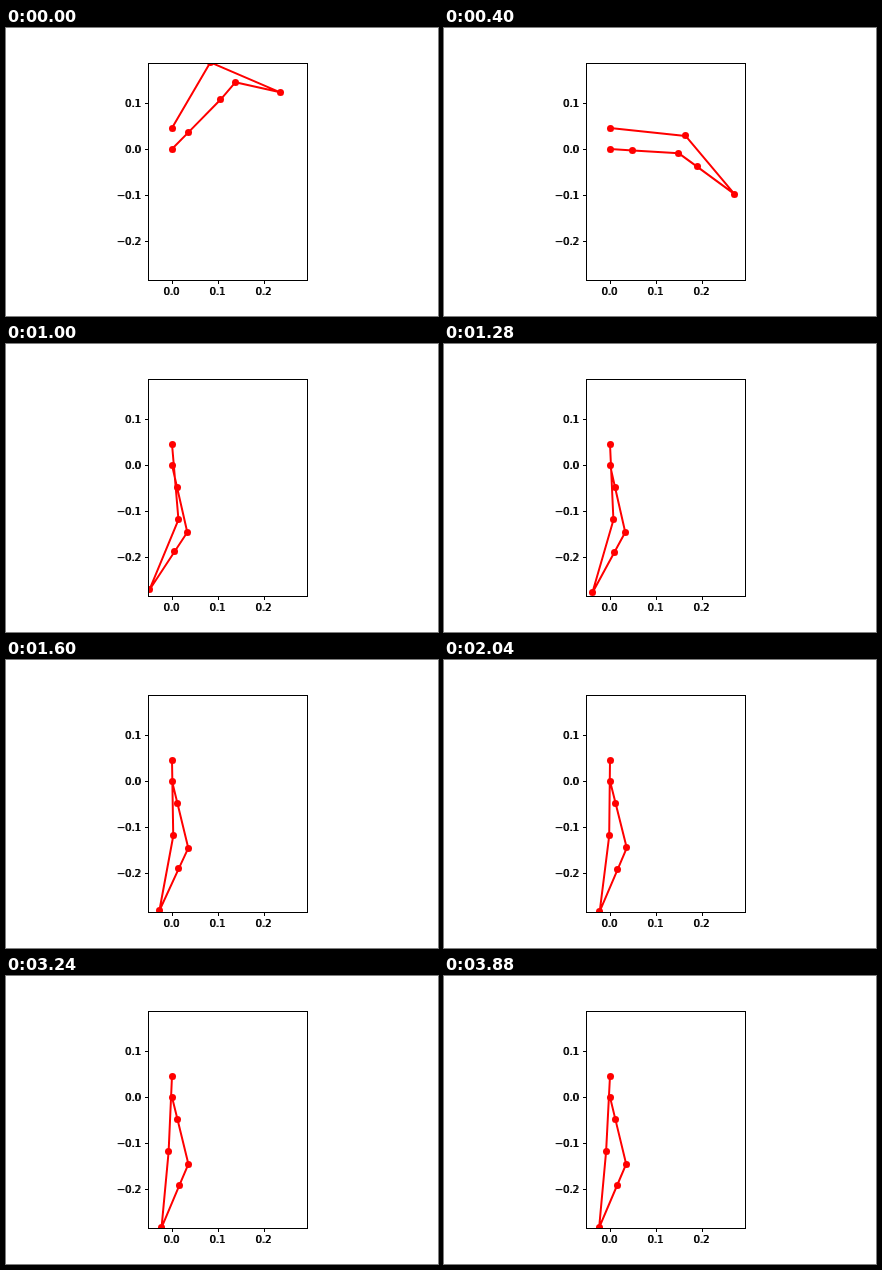
Animation of 432x288 px, one loop 4 s. Source, as an HTML page with a canvas:

```html
<!DOCTYPE html>
<html lang="en">
<head>
<meta charset="utf-8">
<style>
  html, body { margin: 0; width: 432px; height: 288px; overflow: hidden; background: #fff; }
  canvas { display: block; }
</style>
</head>
<body>
<canvas id="stage" width="432" height="288"></canvas>
<script>
const ctx = document.getElementById('stage').getContext('2d');
const LOOP = 4000, STEP = 40, LAST = 3880;
const box = { left: 142.5, top: 35.5, right: 301.5, bottom: 252.5 };
const base = [166, 121], upperBase = [166, 100], unit = 46;
const SHORT = 23, LONG = 46, ARM = 76;
const rad = Math.PI / 180;

// Fall from a starting angle towards a rest angle that is still settling
function fall(t, { from, rest, drift, settle, time, power }) {
  const goal = rest + drift * Math.exp(-t / settle);
  return from + (goal - from) * (1 - Math.exp(-((t / time) ** power)));
}
const upperArm = { from: -59.7, rest: 93.4, drift: -21.5, settle: 1000, time: 480, power: 2.43 };
const foreArm = { from: 23.2, rest: 95.2, drift: 202, settle: 440, time: 682, power: 3.1 };

const reach = ([x, y], length, angle) =>
  [x + length * Math.cos(angle), y + length * Math.sin(angle)];

// Joint between p and q with link lengths a and b, bent to the left of p-q
function bend(p, q, a, b) {
  const dx = q[0] - p[0], dy = q[1] - p[1], d = Math.hypot(dx, dy);
  const cos = Math.min(1, (a * a + d * d - b * b) / (2 * a * d));
  return reach(p, a, Math.atan2(dy, dx) - Math.acos(cos));
}

function linkage(t) {
  const elbow = reach(upperBase, ARM, fall(t, upperArm) * rad);
  const tip = reach(elbow, ARM, fall(t, foreArm) * rad);
  const fold = 8.7 * Math.max(0, 1 - t / 400) ** 2;
  const knee = bend(base, tip, SHORT + LONG, SHORT + LONG - fold);
  const thigh = base.map((v, i) => v + (knee[i] - v) * SHORT / (SHORT + LONG));
  const shin = bend(knee, tip, SHORT, LONG);
  return [base, thigh, knee, shin, tip, elbow, upperBase];
}

function drawLinkage(t) {
  const joints = linkage(t);
  ctx.save();
  ctx.beginPath();
  ctx.rect(box.left, box.top, box.right - box.left, box.bottom - box.top);
  ctx.clip();
  ctx.strokeStyle = ctx.fillStyle = '#f00';
  ctx.lineWidth = 2;
  ctx.lineJoin = 'round';
  ctx.beginPath();
  joints.forEach(p => ctx.lineTo(...p));
  ctx.stroke();
  for (const [x, y] of joints) {
    ctx.beginPath();
    ctx.arc(Math.floor(x) + 0.5, Math.floor(y) + 0.5, 3.5, 0, 2 * Math.PI);
    ctx.fill();
  }
  ctx.restore();
}

// Painted twice, slightly apart, for the heavy look of the labels
function label(value, x, y, align) {
  const text = value.toFixed(1).replace('-', '\u2212');
  ctx.textAlign = align;
  ctx.fillText(text, x, y);
  ctx.fillText(text, x - 0.8, y);
}

function drawAxes() {
  ctx.strokeStyle = ctx.fillStyle = '#000';
  ctx.lineWidth = 1;
  ctx.font = '10px "DejaVu Sans", sans-serif';
  ctx.strokeRect(box.left, box.top, box.right - box.left, box.bottom - box.top);
  ctx.beginPath();
  for (let n = 0; n <= 2; n++) {
    const x = base[0] + n * unit + 0.5;
    ctx.moveTo(x, box.bottom);
    ctx.lineTo(x, box.bottom + 3.5);
    label(n / 10, x - 0.5, box.bottom + 14.5, 'center');
  }
  for (let n = -2; n <= 1; n++) {
    const y = base[1] - n * unit + 0.5;
    ctx.moveTo(box.left, y);
    ctx.lineTo(box.left - 3.5, y);
    label(n / 10, box.left - 7, y + 3.5, 'right');
  }
  ctx.stroke();
}

function frame() {
  const t = Math.min(LAST, Math.floor(performance.now() % LOOP / STEP) * STEP);
  ctx.fillStyle = '#fff';
  ctx.fillRect(0, 0, 432, 288);
  drawLinkage(t);
  drawAxes();
  requestAnimationFrame(frame);
}
frame();
</script>
</body>
</html>
```
